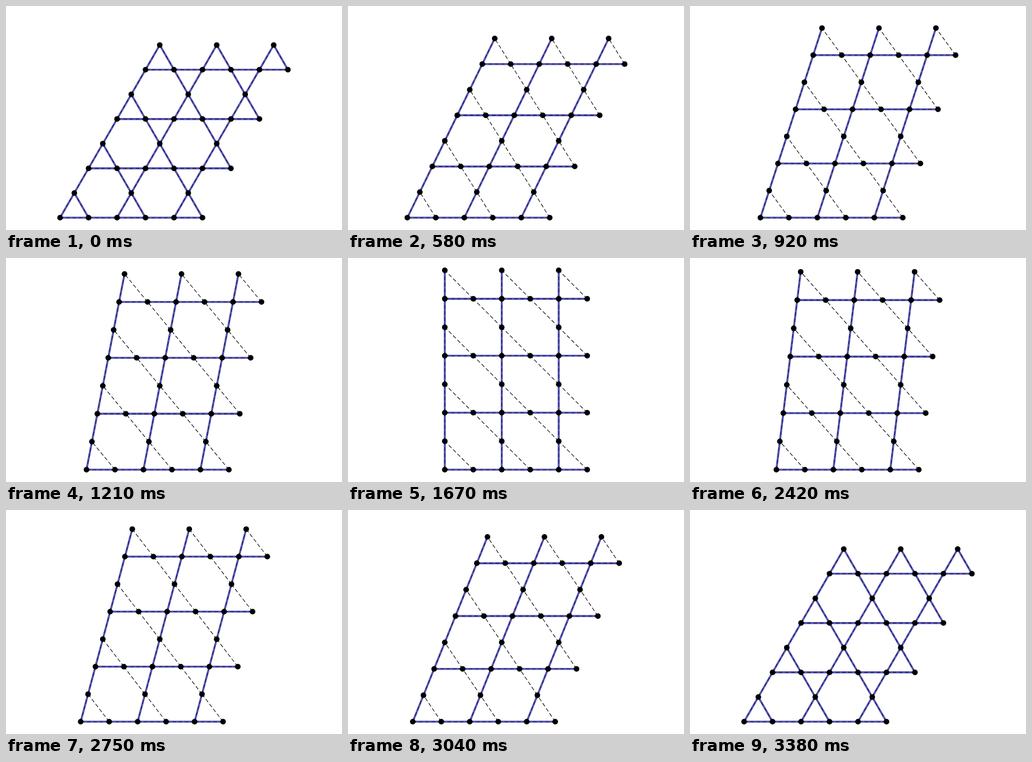
These frames come from a looping animation (600x400 px, 3430 ms). An HTML page with a canvas:

```html
<!DOCTYPE html>
<html lang="en">
<head>
<meta charset="utf-8">
<title>Kagome lattice shear</title>
<style>
  html, body { margin: 0; width: 100%; height: 100%; overflow: hidden; background: #fff; }
  canvas { display: block; }
</style>
</head>
<body>
<canvas id="stage" width="600" height="400"></canvas>
<script>
const ctx = document.getElementById('stage').getContext('2d');
const LOOP = 3430, UNIT = 356 / 7, LEFT = 300 - 2.5 * UNIT, BOTTOM = 378, COLS = 6, ROWS = 8;
const clamp = (v, lo, hi) => Math.min(hi, Math.max(lo, v));

// Sites fill a grid, leaving out those where both indices are odd.
const isSite = (i, j) => i >= 0 && i < COLS && j >= 0 && j < ROWS && !(i % 2 && j % 2);
const sites = [], axisBonds = [], diagonalBonds = [];
for (let j = 0; j < ROWS; j++) {
  for (let i = 0; i < COLS; i++) {
    if (!isSite(i, j)) continue;
    sites.push([i, j]);
    const link = (list, di, dj) => {
      if (isSite(i + di, j + dj)) list.push([[i, j], [i + di, j + dj]]);
    };
    link(axisBonds, 1, 0);
    link(axisBonds, 0, 1);
    if (i % 2 || j % 2) link(diagonalBonds, -1, 1);
  }
}

// Lattice angle in degrees: one degree per tick at 24 ticks a second.
function angleAt(ms) {
  const tick = Math.floor((Math.floor(ms / 10) * 10 + 4.99) * 0.024);
  return 60 + clamp(tick - 10, 0, 30) - clamp(tick - 51, 0, 30);
}

function strokeBonds(bonds, place, color, width, dash) {
  ctx.strokeStyle = color;
  ctx.lineWidth = width;
  ctx.setLineDash(dash);
  ctx.beginPath();
  for (const [a, b] of bonds) {
    ctx.moveTo(...place(a));
    ctx.lineTo(...place(b));
  }
  ctx.stroke();
}

function draw(ms) {
  const degrees = angleAt(ms), angle = degrees * Math.PI / 180;
  // The row at height 3 keeps its horizontal position.
  const place = ([i, j]) => [
    LEFT + UNIT * (i + (j - 3) * Math.cos(angle)),
    BOTTOM - UNIT * j * Math.sin(angle)
  ];
  const allBonds = [...axisBonds, ...diagonalBonds];
  const rigidBonds = degrees === 60 ? allBonds : axisBonds;

  ctx.clearRect(0, 0, 600, 400);
  strokeBonds(rigidBonds, place, '#5a5ab4', 3.6, []);
  strokeBonds(rigidBonds, place, '#14145a', 1.1, [7, 4]);
  if (degrees !== 60) strokeBonds(diagonalBonds, place, '#000', 1.1, [7, 4]);

  ctx.fillStyle = '#000';
  for (const site of sites) {
    ctx.beginPath();
    ctx.arc(...place(site), 5, 0, 2 * Math.PI);
    ctx.fill();
  }
}

function play(now) {
  draw(now % LOOP);
  requestAnimationFrame(play);
}
draw(0);
requestAnimationFrame(play);
</script>
</body>
</html>
```
